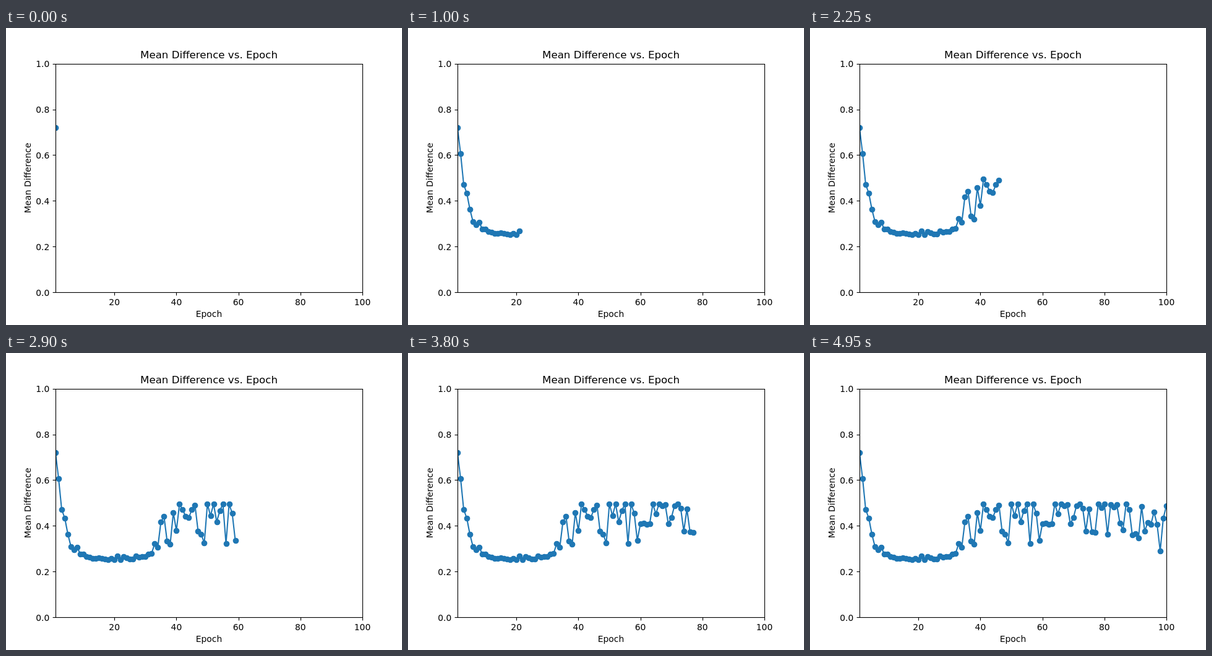
Write an HTML page with a canvas that moves like this. It is 640 px wide and 480 px high and loops after 5 s.

```html
<!DOCTYPE html>
<html lang="en">
<head>
<meta charset="utf-8">
<title>Mean Difference vs. Epoch</title>
<style>
  html, body { margin: 0; width: 100%; height: 100%; overflow: hidden; background: #fff; }
  canvas { display: block; }
</style>
</head>
<body>
<canvas id="chart" width="640" height="480"></canvas>
<script>
const ctx = document.getElementById('chart').getContext('2d');
const LEFT = 80, RIGHT = 576, TOP = 57.6, BOTTOM = 427.2;
const STEP_MS = 50, EPOCHS = 100, BLUE = '#1f77b4';

// Height of each epoch's point on the stage, in pixels
const heights = [
  161, 203, 253, 267, 293, 313, 318, 314, 325, 325,
  329, 330, 332, 332, 331, 332, 333, 334, 332, 334,
  328, 334, 329, 331, 333, 333, 328, 330, 329, 329,
  325, 324, 308, 314, 273, 264, 304, 309, 258, 287,
  244, 253, 264, 266, 253, 246, 288, 293, 307, 244,
  263, 244, 273, 255, 244, 308, 244, 259, 303, 276,
  275, 277, 276, 244, 260, 244, 247, 245, 276, 266,
  247, 244, 251, 288, 252, 289, 290, 244, 250, 244,
  293, 245, 249, 245, 275, 286, 244, 253, 294, 292,
  299, 248, 288, 274, 277, 257, 277, 320, 267, 247
];

const epochX = epoch => LEFT + (epoch - 1) * (RIGHT - LEFT) / (EPOCHS - 1);
const valueY = value => BOTTOM - value * (BOTTOM - TOP);
const snap = v => Math.round(v) + 0.5;

function text(str, x, y, align = 'center', size = 13.89) {
  ctx.font = `${size}px "DejaVu Sans", sans-serif`;
  ctx.textAlign = align;
  ctx.fillText(str, x, y);
}

function segment(x1, y1, x2, y2) {
  ctx.beginPath();
  ctx.moveTo(x1, y1);
  ctx.lineTo(x2, y2);
  ctx.stroke();
}

function drawSeries(count) {
  ctx.save();
  ctx.beginPath();
  ctx.rect(LEFT, 58, RIGHT - LEFT, 369);
  ctx.clip();
  ctx.strokeStyle = ctx.fillStyle = BLUE;
  ctx.lineWidth = 2.083;
  ctx.lineJoin = 'round';
  const points = heights.slice(0, count).map((y, i) => [epochX(i + 1), y]);
  ctx.beginPath();
  points.forEach(([x, y]) => ctx.lineTo(x, y));
  ctx.stroke();
  for (const [x, y] of points) {
    ctx.beginPath();
    ctx.arc(snap(x), snap(y), 4.86, 0, 2 * Math.PI);
    ctx.fill();
  }
  ctx.restore();
}

function drawAxes() {
  ctx.strokeStyle = ctx.fillStyle = '#000';
  ctx.lineWidth = 1.11;
  ctx.strokeRect(80.5, 58.5, 496, 369);
  for (let epoch = 20; epoch <= EPOCHS; epoch += 20) {
    const x = epochX(epoch);
    segment(snap(x), 427.5, snap(x), 432.4);
    text(epoch, x, 448);
  }
  for (let i = 0; i <= 5; i++) {
    const y = valueY(i / 5);
    segment(75.6, snap(y), 80.5, snap(y));
    text((i / 5).toFixed(1), 70.3, Math.round(y + 5.3), 'right');
  }
  text('Mean Difference vs. Epoch', 328, 49, 'center', 16.67);
  text('Epoch', 328, 467);
  ctx.save();
  ctx.translate(40, 242.4);
  ctx.rotate(-Math.PI / 2);
  text('Mean Difference', 0, 0);
  ctx.restore();
}

function draw() {
  const epoch = Math.floor(performance.now() / STEP_MS) % EPOCHS + 1;
  ctx.fillStyle = '#fff';
  ctx.fillRect(0, 0, 640, 480);
  drawSeries(epoch);
  drawAxes();
  requestAnimationFrame(draw);
}
draw();
</script>
</body>
</html>
```
